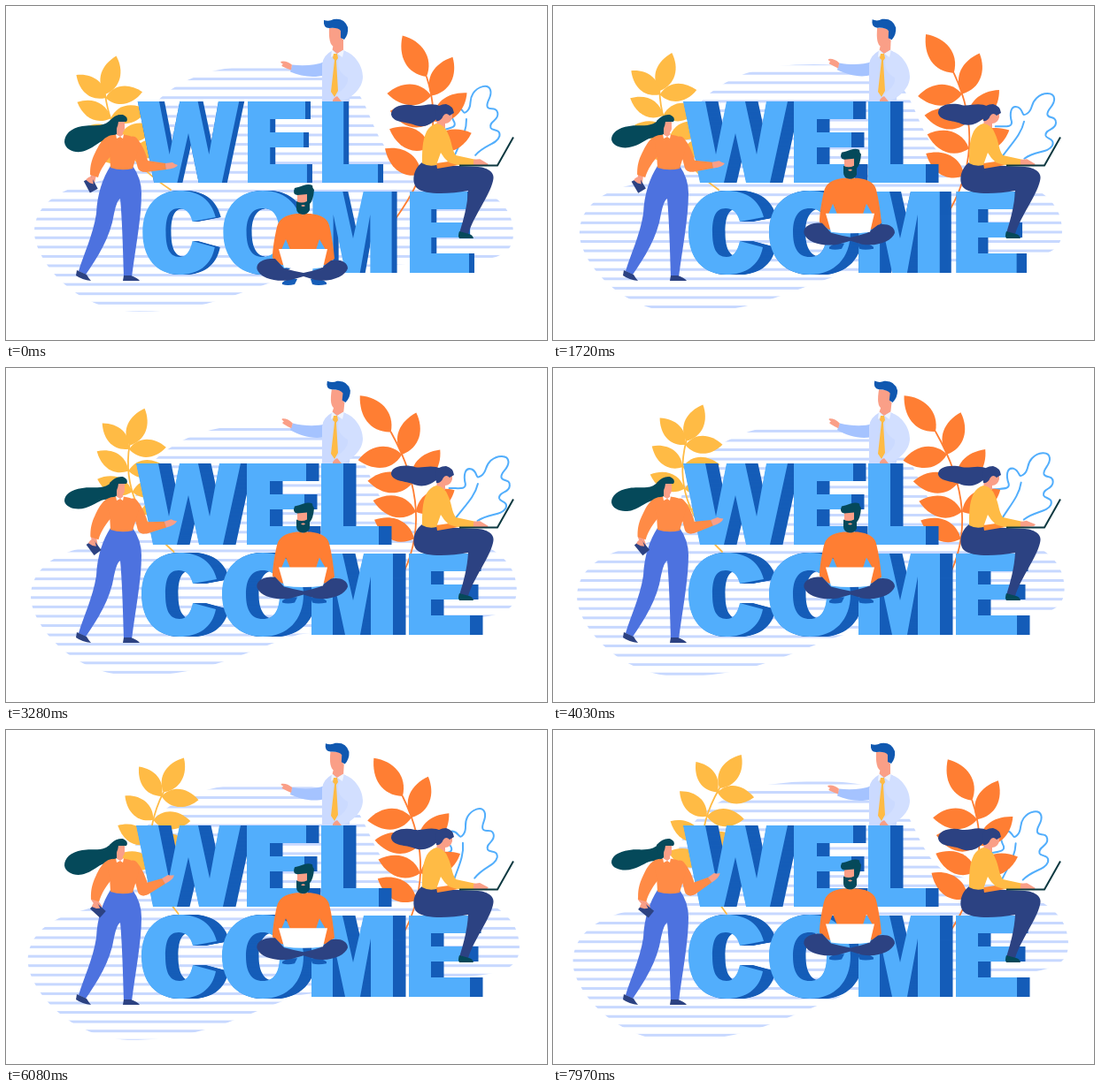
An HTML page with a canvas that plays this animation: 611 px wide and 378 px high, repeating every 8 s.

```html
<!DOCTYPE html>
<html lang="en">
<head>
<meta charset="utf-8">
<title>Welcome</title>
<style>
html, body { margin: 0; width: 100%; height: 100%; overflow: hidden; background: #fff; }
canvas { display: block; width: 611px; height: 378px; }
</style>
</head>
<body>
<canvas id="stage" role="img" aria-label="WELCOME"></canvas>
<script>
const LOOP = 8000;
const BLUE = '#52aefc', DEEP = '#155db8', NAVY = '#2c4282', TEAL = '#05495a';
const SKIN = '#fa9f87', ORANGE = '#ff7e33', CORAL = '#ff8b46', YELLOW = '#ffbb45', STRIPE = '#c7d8ff';

const canvas = document.getElementById('stage');
const ctx = canvas.getContext('2d');
const ratio = window.devicePixelRatio || 1;
canvas.width = 611 * ratio;
canvas.height = 378 * ratio;

// ---- helpers ----
const mix = (a, b, p) => a + (b - a) * p;
const mixPoint = (a, b, p) => [mix(a[0], b[0], p), mix(a[1], b[1], p)];
const ease = p => (1 - Math.cos(Math.PI * Math.min(1, Math.max(0, p)))) / 2;

// Swings between low and high, reaching high at the peak time.
const swing = (t, low, high, peak, period = LOOP) =>
  mix(low, high, (1 + Math.cos(2 * Math.PI * (t - peak) / period)) / 2);

function fill(color, d) {
  ctx.fillStyle = color;
  ctx.fill(new Path2D(d), 'evenodd');
}

function line(color, width, d, cap = 'round') {
  ctx.strokeStyle = color;
  ctx.lineWidth = width;
  ctx.lineCap = cap;
  ctx.lineJoin = 'round';
  ctx.stroke(new Path2D(d));
}

function group(draw, { x = 0, y = 0, turn = 0, scaleX = 1, scaleY = 1, pivot = [0, 0] }) {
  ctx.save();
  ctx.translate(x + pivot[0], y + pivot[1]);
  ctx.rotate(turn * Math.PI / 180);
  ctx.scale(scaleX, scaleY);
  ctx.translate(-pivot[0], -pivot[1]);
  draw();
  ctx.restore();
}

// ---- striped background: a slowly turning cloud with stripes sinking through it ----
const CLOUD = new Path2D('M255 70C300 66 350 68 385 85C412 105 412 150 440 172C470 192 573 195 573 256'
  + 'C574 300 520 284 400 296L330 303C270 320 230 346 150 346C75 346 32 285 32 256'
  + 'C32 225 60 208 90 202C150 190 145 165 152 140C160 105 205 75 255 70Z');

function background(t) {
  const p = t / LOOP, gap = 10.57;
  const cloud = new Path2D();
  cloud.addPath(CLOUD, new DOMMatrix()
    .translate(310 - 2 * p, 215 - 6 * p).rotate(-2.7 * p).scale(1 + 0.035 * p).translate(-310, -215));
  ctx.save();
  ctx.clip(cloud);
  ctx.fillStyle = STRIPE;
  const top = 72 - 4 * gap + t * 0.00247;
  for (let y = top; y < 360; y += gap) ctx.fillRect(0, y - 1.5, 611, 3);
  ctx.restore();
}

// ---- plants ----
function stemPoint([a, b, c], s) {
  return mixPoint(mixPoint(a, b, s), mixPoint(b, c, s), s);
}

// One leaf at the tip, then four pairs down the stem whose angles change by a fixed step.
function plant({ color, stem, turn, size, tip, first, left, right }) {
  const leaf = (s, angle, length) => {
    const [x, y] = stemPoint(stem, s), k = length / 44;
    group(() => fill(color, 'M0 0C-15 -12 -13 -30 0 -44C13 -31 15 -12 0 0Z'),
      { x, y, turn: angle + turn, scaleX: k, scaleY: k });
  };
  line(color, 1.8, `M${stem[0]}Q${stem[1]} ${stem[2]}`);
  leaf(1, tip, size * 1.08);
  for (let i = 0; i < 4; i++) {
    const s = first - i * 0.187;
    leaf(s, left.angle + i * left.step, size);
    leaf(s, right.angle + i * right.step, size);
  }
}

function yellowPlant(t) {
  const p = ease(t / LOOP);
  plant({
    color: YELLOW, size: 42, turn: 17 * p, tip: 16, first: 0.97,
    left: { angle: -52, step: -12 }, right: { angle: 81, step: -4 },
    stem: [
      mixPoint([186, 208], [196, 208], p),
      mixPoint([120, 165], [145, 140], p),
      mixPoint([112, 100], [188, 66], p)
    ]
  });
}

function orangePlant(t) {
  const p = swing(t, 0, 1, 4070, 10300);
  plant({
    color: ORANGE, size: 50, turn: 12 * (1 - p), tip: -41, first: 0.86,
    left: { angle: -98, step: 11 }, right: { angle: 18, step: 21 },
    stem: [
      mixPoint([440, 240], [445, 240], p),
      mixPoint([502, 155], [485, 165], p),
      mixPoint([480, 81], [432, 72], p)
    ]
  });
}

function outlineLeaf(t) {
  group(() => {
    line(BLUE, 2, 'M498 137C508 136 517 138 516 131C513 122 514 112 522 114C530 117 526 126 533 121'
      + 'C540 116 536 110 543 103C550 96 562 95 563 103C564 111 555 115 556 121'
      + 'C557 126 566 122 566 130C566 139 554 137 555 145C556 149 566 148 563 156C558 165 545 162 532 172');
    line(BLUE, 2, 'M500 182C512 160 527 148 530 130');
  }, { pivot: [515, 180], turn: swing(t, -16, 5, 2600, 7600) });
}

// ---- lettering: outline and horizontal centre; the depth grows letter after letter ----
const LETTERS = [
  ['M147 108H172L184 168L196 108H217L230 168L241 108H265L245 200H218L206 144L193 200H166Z', 206],
  ['M272 108H339V128H298V143H337V160H298V179H341V200H272Z', 306],
  ['M356 108H381V179H421V200H356Z', 389],
  ['M238 239L211 244Q207 229 195 229C183 229 180 240 180 256C180 273 184 284 196 284Q207 284 211 266'
    + 'L237 273C233 294 217 304 196 304C169 304 153 285 153 256C153 227 169 209 196 209C218 209 233 219 238 239Z', 196],
  ['M290 209C318 209 336 227 336 256C336 285 318 304 290 304C262 304 244 285 244 256C244 227 262 209 290 209Z'
    + 'M290 229C277 229 271 239 271 256C271 274 277 284 290 284C303 284 309 274 309 256C309 239 303 229 290 229Z', 290],
  ['M345 210H380L392 263L404 210H437V302H412V236L400 302H383L369 236V302H345Z', 391],
  ['M455 210H522V230H480V245H519V262H480V280H524V302H455Z', 490]
];

function lettering(t) {
  LETTERS.forEach(([d, centre], i) => {
    const p = ease((t - i * 170) / 1200);
    const depth = mix(6, 14.5, p);
    const place = { scaleX: mix(0.97, 1, p), pivot: [centre, 0] };
    for (let x = depth; x > 0; x--) group(() => fill(DEEP, d), { x, ...place });
    group(() => fill(BLUE, d), place);
  });
}

// ---- people ----
function manInShirt(t) {
  group(() => {
    fill('#a5c3ff', 'M360 63C350 67 336 68 323 66L321 74C333 79 347 82 360 78Z');
    fill(SKIN, 'M323 66Q317 61 311 62Q309 63 313 65Q310 67 313 68Q317 70 322 72Z');
  }, { pivot: [358, 72], turn: swing(t, -1, 6, 3700) });

  group(() => {
    fill(SKIN, 'M371 38H381V53L374 58L368 52Z');
    fill(SKIN, 'M365 25H380V38Q377 46 370 46Q364 43 365 25Z');
    fill('#1058b0', 'M359 16Q365 18 370 15Q382 13 386 24Q387 32 382 38L378 36L378 28Q375 24 365 25Q358 25 359 16Z');
  }, { pivot: [374, 52], turn: swing(t, 0, 6.5, 4000) });

  fill('#cbdaff', 'M369 50L374 54L381 50Q390 53 390 68L388 108H357V66Q358 56 369 50Z');
  fill('#d2dfff', 'M382 51C394 54 403 68 403 80C403 94 389 105 377 109L372 101C382 94 387 88 386 81C374 75 371 60 382 51Z');
  fill('#eff4ff', 'M368 49L373 54L367 58ZM382 49L374 54L380 58Z');
  fill(YELLOW, 'M370 54H374L375 59L373 62L375 96L371 103L367 97L371 61L369 59Z');
  fill(SKIN, 'M374 102Q368 105 369 109Q374 112 379 108Z');
}

function standingWoman(t) {
  const p = ease(t / LOOP), phone = 9.5 * p;

  group(() => fill(TEAL, 'M130 124C123 123 120 129 113 133C104 137 96 134 86 136C73 138 66 145 66 153'
    + 'C67 162 80 166 90 162C102 158 106 150 115 151Q127 150 128 137Z'),
  { pivot: [126, 136], scaleY: swing(t, 0.82, 1.06, 0, 5300) });

  fill('#4d72df', 'M118 181C109 195 103 213 102 235C98 260 88 280 82 300L90 304C103 285 118 262 122 235'
    + 'Q125 220 129 218C131 240 132 270 133 307H142C146 275 153 240 153 212Q153 195 143 181Z');
  fill(NAVY, 'M80 299L91 304Q94 309 96 311Q86 310 79 305ZM133 305H141Q149 308 151 311H132Z');

  line(SKIN, 6, `M99 191L${97 + phone} 200`);
  group(() => {
    fill(NAVY, 'M91 195H101V210H91Z');
    fill(SKIN, 'M94 195Q99 192 102 196L99 203L96 200Z');
  }, { x: phone, y: phone / 8, pivot: [96, 203], turn: -28 - phone * 2.4 });
  group(() => fill(CORAL, 'M121 146C109 147 104 159 98 172C95 180 95 186 95 191L104 194C107 184 113 176 119 169Z'),
    { pivot: [115, 155], turn: -phone / 5 });

  line(CORAL, 13, 'M143 154Q151 163 155 181');
  group(() => {
    fill(CORAL, 'M153 174L180 178L181 185L158 188Q149 188 150 179Z');
    fill(SKIN, 'M180 178L188 177Q190 179 194 180Q192 184 181 185Z');
  }, { pivot: [155, 182], turn: -28 * p });

  fill(CORAL, 'M121 146Q130 144 140 147Q151 151 149 164L143 184Q130 187 118 183L117 166Q112 152 121 146Z');
  fill(SKIN, 'M125 139H132V148H125Z');
  fill(SKIN, 'M124 129H134V139Q133 144 129 144Q124 142 124 129Z');
  fill('#fff', 'M124 145L129 148L125 150ZM133 145L129 148L132 150Z');
  fill(TEAL, 'M117 130Q124 122 132 123Q139 126 136 131L127 131Q126 139 122 142Q116 140 117 130Z');
}

function floatingMan(t) {
  group(() => {
    fill(DEEP, 'M312 313Q318 308 329 309L326 315Q318 317 312 315ZM344 309Q356 308 362 313V315Q352 317 346 315Z');
    fill(ORANGE, 'M328 235Q309 237 306 250C303 263 301 276 301 285L311 293L361 293L371 286C370 274 368 260 365 248'
      + 'Q362 237 344 235ZM316 264L321 276H311ZM354 264L361 276H350Z');
    fill(NAVY, 'M304 286C290 285 281 291 284 299C288 308 305 313 322 310L336 306L349 310C367 313 383 306 386 297'
      + 'C386 289 376 286 367 288L355 297Q346 300 336 302Q325 300 314 297Z');
    fill('#fff', 'M308 275H363L358 296Q336 299 314 296Z');
    fill(SKIN, 'M329 211H342V229L335 237L329 230Z');
    fill(TEAL, 'M326 206Q331 205 336 203Q342 201 346 203Q346 206 348 208Q347 220 343 224V231Q341 236 335 236'
      + 'Q328 235 328 229V221Q334 224 340 221V213L329 214Q323 213 326 206Z');
    fill(SKIN, 'M333 226Q336 224 338 226Q336 228 333 226Z');
  }, { y: -49.5 * ease(t / 2400) - 6 * ease((t - 5300) / 2700) });
}

function seatedWoman(t) {
  fill(NAVY, 'M470 177C461 183 457 198 464 206C473 214 500 213 522 209C521 226 517 241 512 257L522 258'
    + 'C528 238 546 215 550 198C553 189 545 183 533 182L488 180Z');
  fill(TEAL, 'M512 255L523 258Q527 259 528 263H512Q510 260 512 255Z');
  fill(SKIN, 'M487 125H496V138H486Z');
  fill('#ff8a33', 'M486 178L500 176L511 180L487 184Z');
  fill(YELLOW, 'M486 133Q495 134 499 144C504 154 503 162 508 169L531 174L530 180Q512 182 500 177'
    + 'Q495 173 491 166L486 180Q477 182 470 178C470 165 470 152 475 142Q479 135 486 133Z');
  group(() => fill(SKIN, 'M528 174L535 173Q539 175 545 178L543 180L528 180Z'),
    { pivot: [530, 177], turn: swing(t, -4, 4, 0, 1600) });
  fill(SKIN, 'M489 120H504V126Q502 133 496 133Q489 132 489 120Z');
  group(() => fill(NAVY, 'M492 114C480 108 472 114 462 113C450 110 435 113 435 123C437 132 449 131 459 134'
    + 'C470 139 479 135 485 129Q491 126 493 124Z'),
  { pivot: [492, 120], turn: swing(t, 0, 3, 3300), scaleY: swing(t, 0.89, 1, 0) });
  fill(NAVY, 'M485 118Q488 111 497 111Q505 113 506 121L501 124Q497 120 494 124Q491 131 486 130Z');
  line('#0b3840', 2, 'M512 180.5H555L573 148.5', 'butt');
}

function draw(t) {
  ctx.setTransform(ratio, 0, 0, ratio, 0, 0);
  ctx.fillStyle = '#fff';
  ctx.fillRect(0, 0, 611, 378);
  [background, yellowPlant, outlineLeaf, orangePlant, manInShirt, lettering,
    standingWoman, floatingMan, seatedWoman].forEach(layer => layer(t));
}

function frame() {
  draw(performance.now() % LOOP);
  requestAnimationFrame(frame);
}
frame();
</script>
</body>
</html>
```
